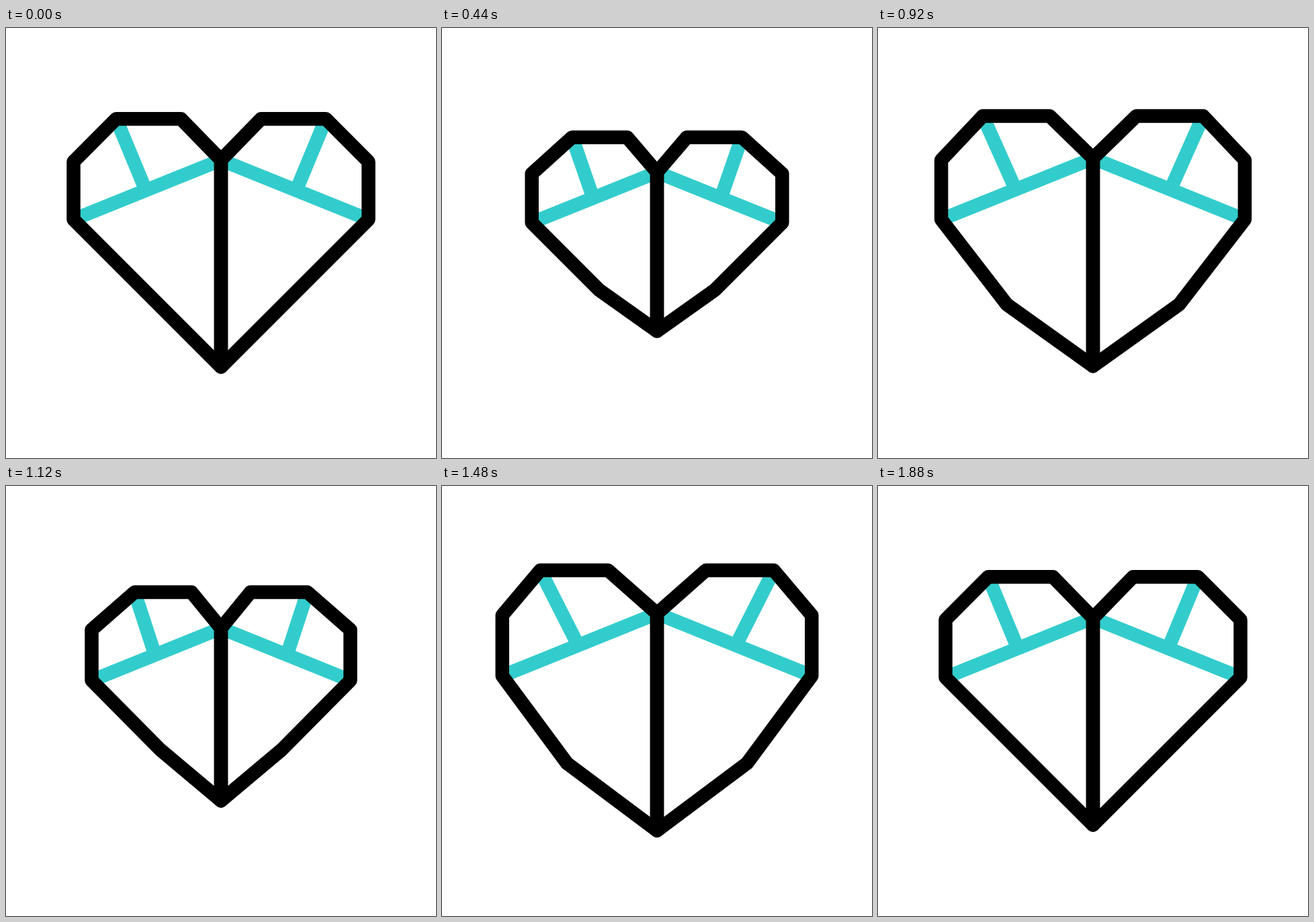
An HTML page with a canvas that plays this animation: 640 px wide and 640 px high, repeating every 2 s.

```html
<!DOCTYPE html>
<html lang="en">
<head>
<meta charset="utf-8">
<title>Beating heart</title>
<style>
  html, body { margin: 0; width: 100%; height: 100%; overflow: hidden; background: #fff; }
  canvas { display: block; width: 640px; height: 640px; }
</style>
</head>
<body>
<canvas id="stage" width="640" height="640"></canvas>
<script>
const ctx = document.getElementById("stage").getContext("2d");
const LOOP = 2000, STEP = 40, SIZE = 640, LINE = 20.5;
const CENTER = { x: 320, y: 313 };

// One half of the resting heart, measured outwards and downwards from the center.
const heart = {
  notch: [0, -116.5], inner: [59.5, -177.7], outer: [156, -177.7],
  shoulder: [219.5, -114], side: [219.5, -28], flank: [102, 89.5], tip: [0, 191.5]
};

// scale: overall size; drop: shift down; spread: lobe tops outwards;
// bulge: flank outwards; lift: tip upwards.
const rest = { scale: 1, drop: 0, spread: 0, bulge: 0, lift: 0 };
const beats = [
  { time: 200, ...rest },
  { time: 480, scale: 0.84, drop: 0.6, spread: -6.5, bulge: 0, lift: 26.5 },
  { time: 800, scale: 1.131, drop: 0.7, spread: 11.3, bulge: 38, lift: 3.8 },
  { time: 1080, scale: 0.872, drop: 1, spread: -8.7, bulge: 0, lift: 13.8 },
  { time: 1480, scale: 1.049, drop: -1, spread: 10.2, bulge: 27, lift: 0 },
  { time: 1880, ...rest }
];

const lerp = (a, b, u) => a + (b - a) * u;
const ease = u => u * u * (3 - 2 * u);

function poseAt(time) {
  const next = beats.findIndex(beat => beat.time > time);
  if (next < 1) return rest;
  const from = beats[next - 1], to = beats[next];
  const u = ease((time - from.time) / (to.time - from.time));
  return Object.fromEntries(Object.keys(rest).map(key => [key, lerp(from[key], to[key], u)]));
}

function halfHeart({ scale, drop, spread, bulge, lift }, side) {
  const offsets = {
    inner: [spread, 0], outer: [spread, 0], flank: [bulge, bulge / 4], tip: [0, -lift]
  };
  const half = {};
  for (const [name, [x, y]] of Object.entries(heart)) {
    const [dx, dy] = offsets[name] || [0, 0];
    half[name] = {
      x: CENTER.x + side * (x * scale + dx),
      y: CENTER.y + y * scale + dy + drop
    };
  }
  return half;
}

function stroke(color, points, closed) {
  ctx.beginPath();
  points.forEach(p => ctx.lineTo(p.x, p.y));
  if (closed) ctx.closePath();
  ctx.strokeStyle = color;
  ctx.stroke();
}

function drawCreases({ notch, outer, side }) {
  const joint = { x: lerp(side.x, notch.x, 0.49), y: lerp(side.y, notch.y, 0.49) };
  stroke("#33cccc", [notch, side]);
  stroke("#33cccc", [outer, joint]);
}

function draw(time) {
  const pose = poseAt(time);
  const halves = [-1, 1].map(side => halfHeart(pose, side));
  ctx.fillStyle = "#fff";
  ctx.fillRect(0, 0, SIZE, SIZE);
  ctx.lineWidth = LINE;
  ctx.lineJoin = "round";
  ctx.lineCap = "butt";
  halves.forEach(drawCreases);
  ctx.lineCap = "round";
  // Each outline closes along the shared spine.
  halves.forEach(half => stroke("#000", Object.values(half), true));
}

const start = performance.now();
function tick() {
  const time = (performance.now() - start) % LOOP;
  draw(Math.floor(time / STEP) * STEP);
  requestAnimationFrame(tick);
}
tick();
</script>
</body>
</html>
```
